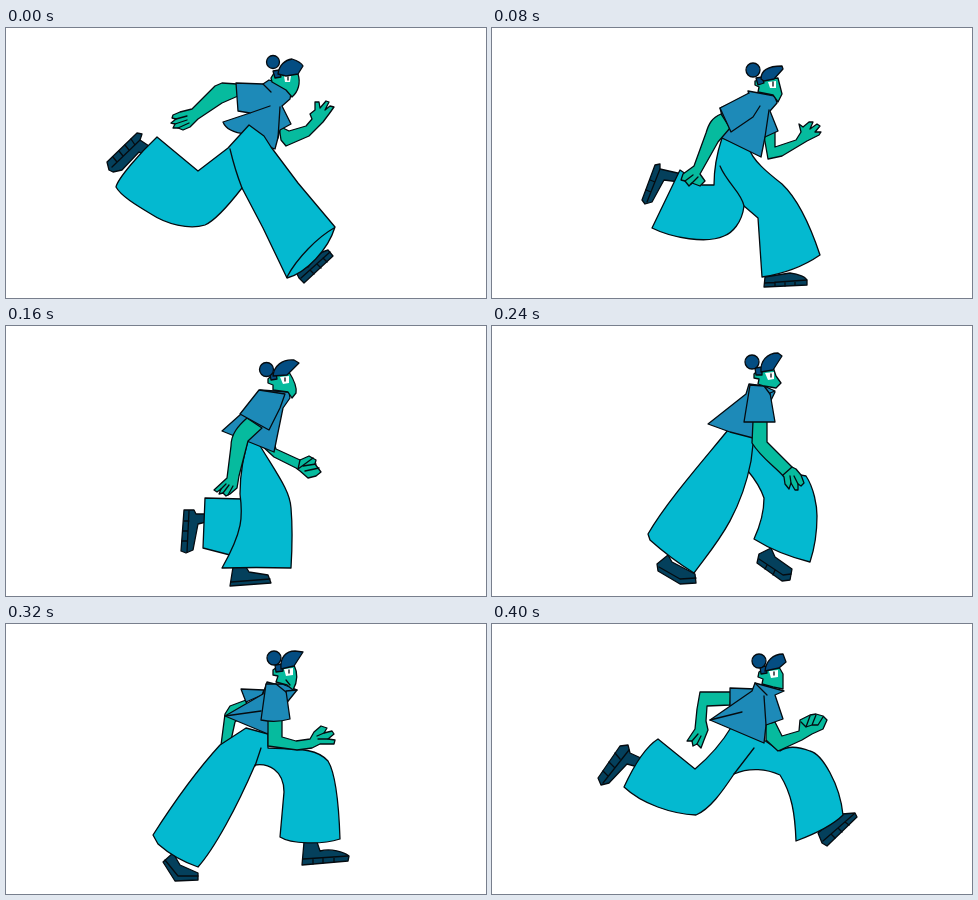
An HTML page for the animation above (480 ms loop, 480 by 270 pixels).

```html
<!DOCTYPE html>
<html lang="en">
<head>
<meta charset="utf-8">
<title>Run cycle</title>
<style>
  html, body { margin: 0; width: 100%; height: 100%; overflow: hidden; background: #fff; }
  svg { display: block; width: 100vw; height: 100vh; }
  g { display: none; stroke: #050b10; stroke-width: 1.3; stroke-linejoin: round; stroke-linecap: round; }
  .pants { fill: #04b9d0; }
  .shirt { fill: #1d8ab8; }
  .skin { fill: #06bb9e; }
  .hair { fill: #044d82; }
  .shoe { fill: #04405c; }
  .eye { fill: #fff; stroke: none; }
  .line { fill: none; }
</style>
</head>
<body>
<svg viewBox="0 0 480 270">
  <!-- leap -->
  <g>
    <path class="skin" d="M231 56L216 55L209 58L186 81L174 84L167 87L166 90L170 91L165 95L169 96L167 100L172 100L177 102L184 99L192 91L216 75L232 68Z"/>
    <path class="line" d="M170 91L181 88M169 96L181 92M172 100L183 95"/>
    <path class="skin" d="M273 98L275 112L280 118L303 108L317 94L323 86L328 79L324 78L319 82L323 74L320 73L314 80L313 74L309 74L309 82L304 86L306 91L300 98L283 103Z"/>
    <path class="shoe" d="M101 134L131 105L136 106L134 112L146 120L139 128L133 124L116 142L107 144L103 142Z"/>
    <path class="line" d="M106 139L134 112M107 129L111 134M113 123L117 128M119 117L123 122M125 111L129 117"/>
    <path class="shoe" d="M288 240L297 234L302 239C308 231 313 224 322 222L327 228L298 255L293 250Z"/>
    <path class="line" d="M295 250L324 224M304 242L308 246M311 236L315 240M317 230L321 234"/>
    <path class="shirt" d="M230 55L257 56L263 52L286 60L284 71L276 78L285 96L274 102L269 121L261 118L240 106C230 105 220 102 217 94L244 85L232 83Z"/>
    <path class="line" d="M274 79L272 110M244 85L264 78M257 56L265 64"/>
    <path class="skin" d="M268 45L292 46C295 55 292 64 286 69L280 62L266 54L265 50Z"/>
    <path class="eye" d="M278 48L285 48L284 54L279 54Z"/>
    <path class="line" d="M282 49V52"/>
    <path class="pants" d="M151 109L192 143L222 120L243 97L258 108L265 119L292 155L329 199C322 222 300 245 281 250L257 200L236 160C222 178 208 193 199 197C183 202 160 196 145 186C130 177 115 168 110 159C112 150 135 124 151 109Z"/>
    <path class="line" d="M224 121Q229 142 236 160M328 200C312 209 291 230 281 249"/>
    <path class="hair" d="M267 43L273 42L275 49L269 50Z"/>
    <path class="hair" d="M272 46C273 37 279 32 286 31C292 33 296 36 297 38L292 46L280 48Z"/>
    <circle class="hair" cx="267" cy="34" r="6.5"/>
  </g>
  <!-- landing -->
  <g>
    <path class="skin" d="M272 108L276 131L290 128L315 113L327 107L329 104L323 104L328 98L325 96L318 101L321 94L317 94L311 99L307 96L309 104L304 112L283 119L283 103Z"/>
    <path class="shoe" d="M150 172L163 137L168 136L168 141L190 146L188 154L172 152L160 174L153 176Z"/>
    <path class="line" d="M155 174L168 141M154 162L159 164M158 152L163 154"/>
    <path class="shoe" d="M273 249L298 245C306 246 315 249 315 253L315 257L272 259Z"/>
    <path class="line" d="M273 255L315 252M283 254V258M293 254V258M303 253V257"/>
    <path class="pants" d="M188 142L210 157L222 157C222 140 225 125 230 110L257 120C260 132 276 145 290 156C307 172 319 200 328 227C312 238 290 246 270 249L266 190L252 178C250 195 240 205 232 208C215 216 180 210 160 200Z"/>
    <path class="line" d="M228 138C235 155 250 165 252 178"/>
    <path class="shirt" d="M256 63L283 68L285 75L278 83L286 103L273 109L269 129L224 107L232 96L228 80L257 67Z"/>
    <path class="line" d="M277 82L273 109"/>
    <path class="skin" d="M229 86C220 90 217 95 214 105L202 138L191 146L189 152L193 153L197 158L200 155L208 158L213 153L208 146L226 114L238 100Z"/>
    <path class="line" d="M193 153L201 147M199 156L206 149"/>
    <path class="shirt" d="M257 65L228 80L239 104L261 89L268 78"/>
    <path class="skin" d="M266 52L286 50L290 66L286 74L281 67L266 64L267 59L263 57L263 53Z"/>
    <path class="eye" d="M276 54L284 53L284 60L278 60Z"/>
    <path class="line" d="M281 54V58"/>
    <path class="hair" d="M264 50L270 49L272 55L266 57Z"/>
    <path class="hair" d="M269 51C269 42 277 38 290 38L291 41L282 51L272 53Z"/>
    <circle class="hair" cx="261" cy="42" r="7"/>
  </g>
  <!-- support -->
  <g>
    <path class="skin" d="M268 117L270 123L294 134L303 130L310 134L309 138L315 146L310 150L302 152L294 145L290 142L268 131L255 119Z"/>
    <path class="line" d="M294 134L292 143L307 132M297 140L310 138M299 145L313 142"/>
    <path class="shoe" d="M178 184L188 184L190 188L200 188L200 196L192 198L187 224L180 227L175 225Z"/>
    <path class="line" d="M183 185L181 226M178 195H183M177 205H182M176 215H181"/>
    <path class="shoe" d="M227 241L240 241L243 246L262 249L265 257L224 260Z"/>
    <path class="line" d="M225 256L264 253"/>
    <path class="pants" d="M199 172L236 173L240 200L224 229L197 222Z"/>
    <path class="pants" d="M243 110C238 130 234 145 234 168C237 190 237 205 216 242Q250 241 285 242C286 225 287 205 285 182C284 164 270 147 250 113Z"/>
    <path class="shirt" d="M254 64L283 66L284 72L277 82L268 126L216 105L235 88Z"/>
    <path class="skin" d="M241 92C232 100 225 108 225 120L221 152L208 164L211 166L215 163L213 168L217 167L220 170L224 168L231 162L233 150L242 115L256 102Z"/>
    <path class="line" d="M215 163L220 158M217 167L223 159M222 169L227 160"/>
    <path class="shirt" d="M253 64L234 88L263 104L274 82L279 68Z"/>
    <path class="skin" d="M265 50L283 46C288 54 291 62 290 67L286 72L282 66L267 64L267 59L262 57L262 53Z"/>
    <path class="eye" d="M274 51L283 50L283 57L277 58Z"/>
    <path class="line" d="M279 52V55"/>
    <path class="hair" d="M264 48L270 47L271 53L265 54Z"/>
    <path class="hair" d="M267 50C268 40 276 33 288 34L293 37L281 49Z"/>
    <circle class="hair" cx="260.5" cy="43.5" r="7"/>
  </g>
  <!-- passing -->
  <g>
    <path class="shoe" d="M165 238L176 229L180 236L203 248L204 257L188 258L166 245Z"/>
    <path class="line" d="M167 241L188 253L204 252"/>
    <path class="shoe" d="M267 228L279 222L283 231L300 243L298 254L290 255L265 237Z"/>
    <path class="line" d="M267 233L291 249L299 248M275 239L273 243M283 244L281 249"/>
    <path class="pants" d="M260 110C272 136 295 147 314 150C322 162 325 180 325 190C325 207 322 224 318 236Q286 228 262 213C268 200 272 188 272 172C268 160 261 151 256 145Z"/>
    <path class="pants" d="M236 104C215 130 175 175 156 208L158 214Q178 232 202 247C220 222 248 193 259 135L262 110Z"/>
    <path class="shirt" d="M257 58L272 60L283 66L268 97L261 112L238 106L216 98L254 68Z"/>
    <path class="skin" d="M261 95L260 117C270 133 285 142 292 151L293 158L297 163L299 157L303 164L306 164L306 158L309 160L312 157L309 149L304 143L300 141L275 116L275 95Z"/>
    <path class="line" d="M291 149L300 141M299 157L298 150M306 158L302 150"/>
    <path class="shirt" d="M258 59L252 96L283 96L278 67L283 65L272 60Z"/>
    <path class="line" d="M272 60L278 68"/>
    <path class="skin" d="M265 45L281 41L284 50L289 57L284 62L272 60L266 58L267 53L262 52L262 48Z"/>
    <path class="eye" d="M273 47L282 46L282 53L276 54Z"/>
    <path class="line" d="M279 48V51"/>
    <path class="hair" d="M263 42L270 41L270 49L264 49Z"/>
    <path class="hair" d="M269 46C268 35 275 27 286 27L290 30L281 44Z"/>
    <circle class="hair" cx="260" cy="36" r="7"/>
  </g>
  <!-- push -->
  <g>
    <path class="skin" d="M240 76L224 82L219 90L215 121L224 121L229 98L242 86Z"/>
    <path class="shoe" d="M157 238L167 229L174 241L192 249L192 256L169 257Z"/>
    <path class="line" d="M159 236L172 252L192 252"/>
    <path class="shoe" d="M298 218L311 218L314 227C325 224 338 228 343 232L342 237L296 241Z"/>
    <path class="line" d="M297 235L342 232M307 235V240M317 234V239M328 233V238"/>
    <path class="shirt" d="M235 65L258 66L256 71L240 78Z"/>
    <path class="pants" d="M240 104L214 121C192 145 170 175 147 211L152 220Q169 235 192 243C208 225 230 185 249 141C262 139 278 146 278 168L274 213C285 220 315 221 334 215C333 185 330 150 322 137C312 126 300 125 262 124L262 110Z"/>
    <path class="line" d="M255 124L249 142"/>
    <path class="shirt" d="M261 58L291 66L287 71L266 97L262 110L219 92L257 70Z"/>
    <path class="line" d="M219 92L255 87"/>
    <path class="skin" d="M262 94L262 122L291 126L306 124L314 120L328 120L329 116L322 115L328 110L326 107L318 109L321 104L315 102L308 108L304 115L290 117L276 113L276 94Z"/>
    <path class="line" d="M322 115L312 115M318 109L311 112"/>
    <path class="shirt" d="M260 60L255 96Q270 99 284 95L280 67L291 66L276 60Z"/>
    <path class="line" d="M270 60L280 68"/>
    <path class="skin" d="M271 43L288 41C292 49 292 57 287 66L281 61L270 58L272 52L267 51L267 46Z"/>
    <path class="eye" d="M278 45L287 44L287 51L280 52Z"/>
    <path class="line" d="M283 46V49M280 56L284 61"/>
    <path class="hair" d="M269 41L276 40L277 47L270 48Z"/>
    <path class="hair" d="M275 45C274 33 280 27 289 27L297 28L288 42Z"/>
    <circle class="hair" cx="268" cy="34" r="7"/>
  </g>
  <!-- take-off -->
  <g>
    <path class="skin" d="M239 68L208 68L205 85L203 105L195 117L200 117L201 122L205 120L209 124L212 116L216 106L214 97L215 82L238 81Z"/>
    <path class="line" d="M200 117L206 110M205 120L209 112"/>
    <path class="shoe" d="M106 154L128 122L136 121L138 129L151 135L146 143L135 140L117 159L109 161Z"/>
    <path class="line" d="M111 159L137 126M111 147L116 152M117 138L122 143M123 129L128 135"/>
    <path class="shoe" d="M326 209L332 204L350 190L363 189L365 193L335 222L330 219Z"/>
    <path class="line" d="M331 217L362 190M339 210L343 214M346 204L350 208M353 198L357 201"/>
    <path class="shirt" d="M238 64L264 65L258 76L238 82Z"/>
    <path class="pants" d="M240 102C228 122 215 135 203 145L166 115C150 125 138 150 132 163C150 180 180 190 204 191C218 185 230 168 242 150C258 143 275 145 288 151C300 170 303 190 304 217C320 211 340 202 351 191C348 160 330 130 318 127C305 122 295 122 288 127L272 116Z"/>
    <path class="line" d="M262 124L242 150"/>
    <path class="skin" d="M274 100L274 116L286 127L310 116L320 110L331 105L335 96L331 92L324 90L318 91L308 96L307 107L290 112L283 98Z"/>
    <path class="line" d="M309 98L314 103L318 92M314 103L320 101L324 91M320 101L326 101L331 93"/>
    <path class="shirt" d="M263 59L292 67L283 71L291 95L274 101L272 119L218 96L260 67Z"/>
    <path class="line" d="M218 96L250 88M272 72L274 101M263 59L275 71"/>
    <path class="skin" d="M270 46L287 43L291 50L291 65L281 63L270 60L271 55L266 53L267 48Z"/>
    <path class="eye" d="M277 47L286 46L286 53L279 54Z"/>
    <path class="line" d="M282 48V51"/>
    <path class="hair" d="M268 43L274 42L275 49L269 50Z"/>
    <path class="hair" d="M273 47C274 37 281 30 291 30L294 38L287 44Z"/>
    <circle class="hair" cx="267" cy="37" r="7"/>
  </g>
</svg>
<script>
  const poses = document.querySelectorAll('g');
  const HOLD = 80;

  function draw(now) {
    const current = Math.floor(now / HOLD) % poses.length;
    poses.forEach((pose, i) => { pose.style.display = i === current ? 'inline' : 'none'; });
  }

  const start = performance.now();
  function tick() {
    draw(performance.now() - start);
    requestAnimationFrame(tick);
  }
  tick();
</script>
</body>
</html>
```
